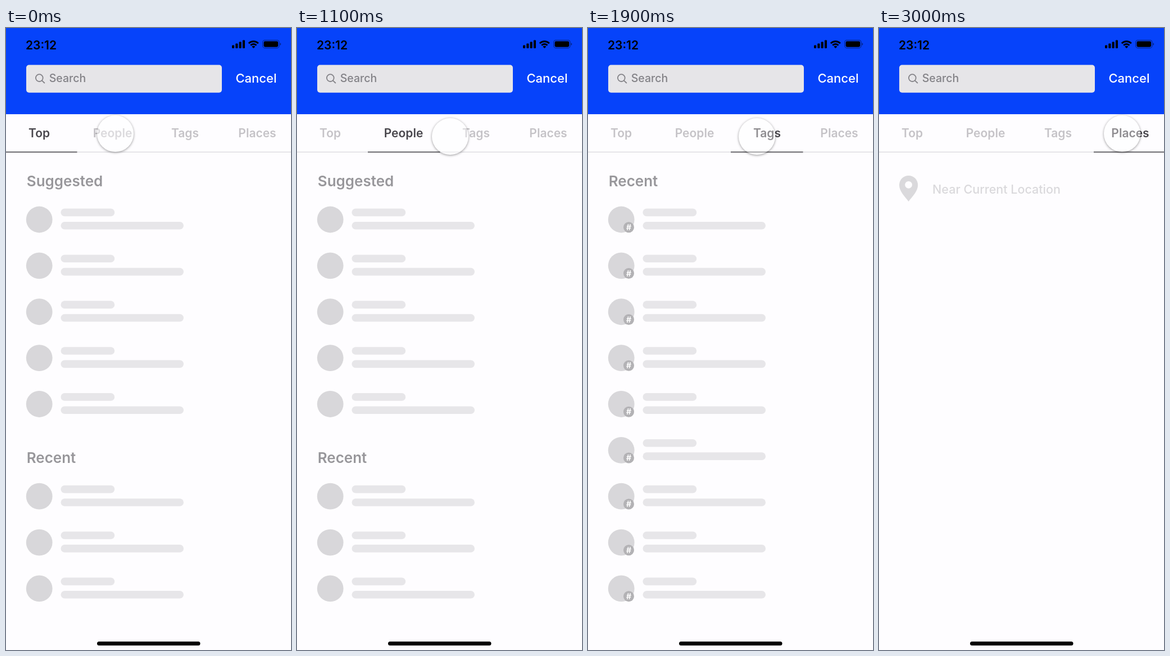
Recreate the animation shown at these times as an HTML page. Size 507 by 1104 pixels, loop 4000 ms.

```html
<!DOCTYPE html>
<html lang="en">
<head>
<meta charset="utf-8">
<title>Search tabs</title>
<style>
  /* page: sliding position, tab: highlighted tab */
  @property --page { syntax: "<number>"; inherits: true; initial-value: 0; }
  @property --tab { syntax: "<number>"; inherits: true; initial-value: 0; }

  html, body { margin: 0; width: 100%; height: 100%; overflow: hidden; background: #fefdff; }
  body {
    position: relative;
    animation: slide 4s ease infinite, highlight 4s linear infinite;
  }
  svg { display: block; width: 100%; height: 100%; font-family: Inter, "Noto Sans", sans-serif; }
  text { text-anchor: middle; }

  .track { transform: translateX(calc(var(--page) * 512px)); }
  .track { transform: translateX(calc(var(--page) * -512px)); }
  .underline { transform: translateX(calc(var(--page) * 128px)); fill: #56555a; }
  .tabs text {
    --on: clamp(0, 1 - max(var(--tab) - var(--i), var(--i) - var(--tab)), 1);
    font-size: 21px; font-weight: 600; fill: #48464c;
    fill-opacity: calc(.315 + .685 * var(--on));
  }
  .heading { font-size: 26px; font-weight: 600; fill: #98979b; }
  .bar { fill: #e7e6e9; }
  .avatar { fill: #d8d7da; }
  .badge { fill: #b3b2b5; }
  .hash { font-size: 14px; font-weight: 700; fill: #fff; }

  .cursor {
    position: absolute; left: 194px; top: 187px;
    width: 65px; height: 65px; margin: -32.5px 0 0 -32.5px;
    border-radius: 50%;
    background: rgba(255, 255, 255, .39);
    box-shadow: 0 1px 4px rgba(0, 0, 0, .42);
    animation: move-x 4s ease-in-out infinite, move-y 4s ease-in-out infinite, press 4s ease-in-out infinite;
  }

  @keyframes slide {
    0%, 6.925% { --page: 0; }
    14.425%, 39.7% { --page: 1; }
    47.2%, 66.925% { --page: 2; }
    74.425%, 100% { --page: 3; }
  }
  @keyframes highlight {
    0%, 6.925% { --tab: 0; }
    9.425%, 39.7% { --tab: 1; }
    42.2%, 66.925% { --tab: 2; }
    69.425%, 100% { --tab: 3; }
  }
  @keyframes move-x {
    0%, 16.75% { left: 194px; }
    33.5%, 47.5% { left: 300.5px; }
    57.5%, 100% { left: 432.5px; }
  }
  @keyframes move-y {
    0%, 16.75% { top: 187px; }
    27%, 47.5% { top: 192.5px; }
    57.5%, 100% { top: 187px; }
  }
  @keyframes press {
    0%, 1.25%, 7.5%, 34%, 40.25%, 61.25%, 67.5%, 100% { transform: none; }
    4.25%, 37%, 64.25% { transform: scale(.9); }
  }
</style>
</head>
<body>
<svg viewBox="0 0 507 1104">
  <rect width="507" height="1104" fill="#fefdff"/>
  <g class="track" id="track"></g>

  <rect width="507" height="153" fill="#0643fa"/>
  <text x="62.5" y="38" font-size="21" font-weight="600">23:12</text>

  <g id="signal"></g>
  <g fill="none" stroke="#000" stroke-width="3">
    <path d="M431.8 27.2a12 12 0 0 1 17 0"/>
    <path d="M435.2 30.7a7.2 7.2 0 0 1 10.2 0"/>
  </g>
  <path d="M440.3 36l-3-3a4.2 4.2 0 0 1 6 0z"/>
  <rect x="456.6" y="21.6" width="29.4" height="14" rx="4" fill="none" stroke="#000" stroke-opacity=".4" stroke-width="1.2"/>
  <rect x="458.5" y="23.5" width="25.6" height="10.2" rx="2.4"/>
  <path d="M487.4 26.2q1.8.6 1.8 2.4t-1.8 2.4z" fill-opacity=".45"/>

  <rect x="36" y="65.5" width="348" height="49.3" rx="5" fill="#e6e5e8"/>
  <g fill="none" stroke="#838287" stroke-width="1.8" stroke-linecap="round">
    <circle cx="59.3" cy="88.6" r="6.4"/>
    <path d="M64 93.3l4.4 4.2"/>
  </g>
  <text x="109.5" y="96" font-size="19.5" font-weight="500" fill="#838287">Search</text>
  <text x="445" y="97" font-size="22" font-weight="500" fill="#fff">Cancel</text>

  <g class="tabs">
    <text x="59" y="194" style="--i:0">Top</text>
    <text x="189.5" y="194" style="--i:1">People</text>
    <text x="318.5" y="194" style="--i:2">Tags</text>
    <text x="447" y="194" style="--i:3">Places</text>
  </g>
  <rect y="219.5" width="507" height="1.5" fill="#dedde1"/>
  <rect class="underline" x="-2" y="219.4" width="128.5" height="1.7"/>
  <rect x="162" y="1089" width="183.5" height="7" rx="3.5"/>
</svg>
<div class="cursor"></div>

<script>
  const PITCH = 81.87;
  const range = (from, to) => Array.from({ length: to - from }, (_, i) => from + i);

  const heading = (label, x, row) =>
    `<text class="heading" x="${x}" y="${281 + row * PITCH}">${label}</text>`;

  const badge = `<circle class="badge" cx="72.5" cy="353.7" r="9.5"/>
    <text class="hash" x="72.5" y="358.8">#</text>`;

  const rows = (from, to, extra = "") => range(from, to).map(i =>
    `<g transform="translate(0 ${i * PITCH})">
      <circle class="avatar" cx="59.2" cy="340" r="23.4"/>
      <rect class="bar" x="97.5" y="320.6" width="95.7" height="13.6" rx="6.8"/>
      <rect class="bar" x="97.5" y="344" width="218.5" height="13.6" rx="6.8"/>${extra}
    </g>`).join("");

  const people = heading("Suggested", 104.5, 0) + rows(0, 5) + heading("Recent", 80.5, 6) + rows(6, 9);
  const tags = heading("Recent", 80.5, 0) + rows(0, 9, badge);
  const places = `<path fill="#dad9dc" fill-rule="evenodd" d="M52.6 308C46 299 36 290 36 278.5a16.6 16.6 0 0 1 33.2 0C69.2 290 59.2 299 52.6 308z
      M46.2 278.3a6.4 6.4 0 1 0 12.8 0a6.4 6.4 0 1 0 -12.8 0z"/>
    <text x="209" y="293.5" font-size="21.5" font-weight="500" fill="#dad9dc">Near Current Location</text>`;

  document.getElementById("track").innerHTML = [people, people, tags, places]
    .map((page, i) => `<g transform="translate(${i * 512} 0)">${page}</g>`).join("");

  document.getElementById("signal").innerHTML = range(0, 4).map(i => {
    const h = 5.6 + i * 3;
    return `<rect x="${402 + i * 6.3}" y="${36 - h}" width="4.1" height="${h}" rx="1.2"/>`;
  }).join("");
</script>
</body>
</html>
```
